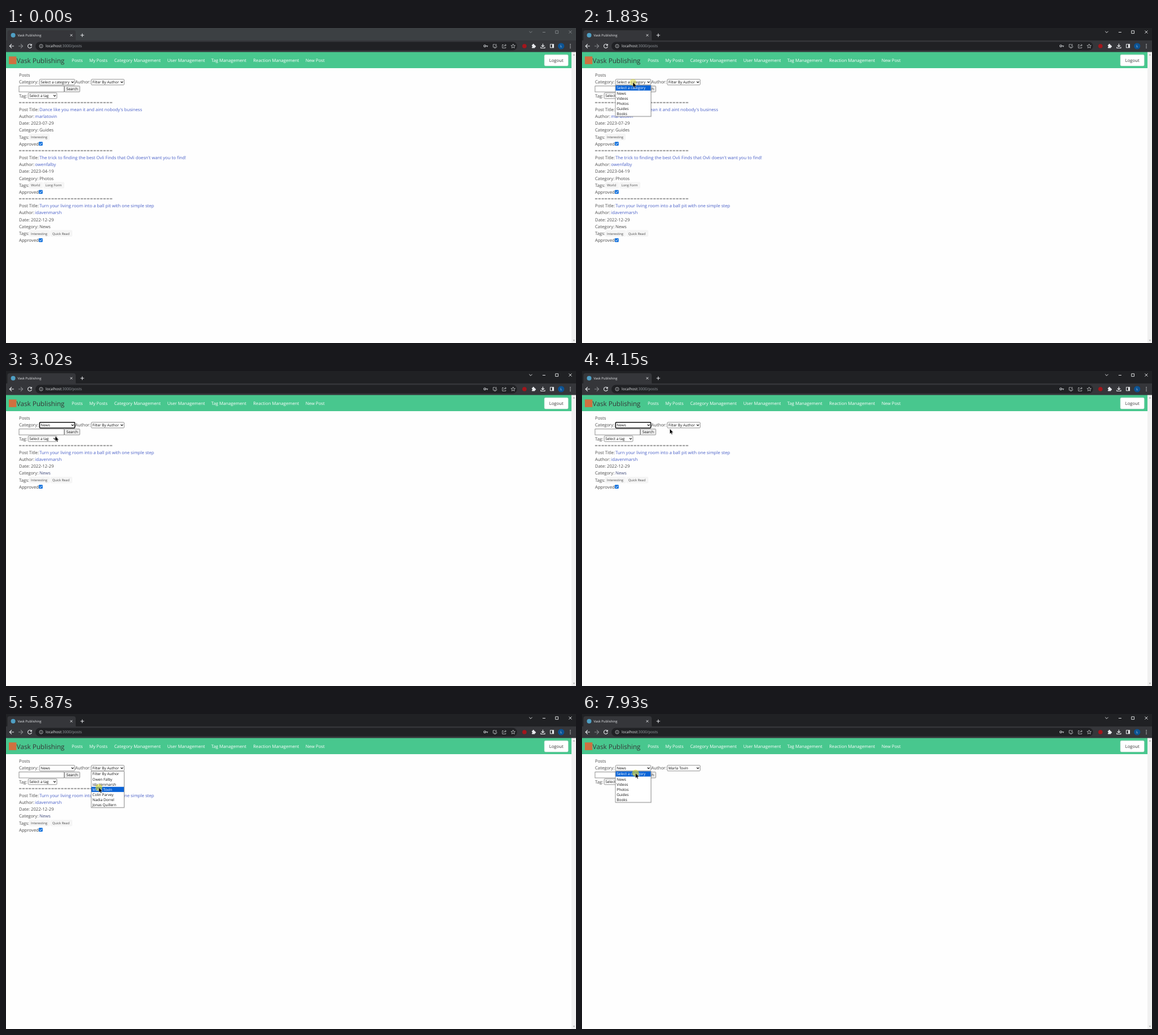
An HTML page that plays this animation: 1006 by 557 pixels, repeating every 7990 ms.

```html
<!DOCTYPE html>
<html lang="en">
<head>
<meta charset="utf-8">
<title>Posts</title>
<style>
  html, body { margin: 0; width: 100%; height: 100%; overflow: hidden; background: #fefefe; }
  svg { display: block; width: 1006px; height: 557px; font-family: "Open Sans", "Noto Sans", sans-serif; }
  text { white-space: pre; text-rendering: geometricPrecision; }
</style>
</head>
<body>
<svg id="stage" viewBox="0 0 1006 557"></svg>
<script>
const LOOP = 7990;
const INK = '#4a4a4a', LINK = '#485fc7', DARK = '#363636', PICK = '#0a63d6';
const BODY = 7.72, FORM = 6.48, TAG = 5.78, ROW = 12.17, OPTION = 9.1;

// Markup helpers; text is placed by the middle of its capitals.
const text = (x, y, s, size = BODY, fill = INK, more = '') =>
  `<text x="${x}" y="${y + size * 0.36}" font-size="${size}" fill="${fill}" ${more}>${s}</text>`;
const rect = (x, y, w, h, fill, more = '') =>
  `<rect x="${x}" y="${y}" width="${w}" height="${h}" fill="${fill}" ${more}/>`;
const line = (d, color, width = 1, more = '') =>
  `<path d="${d}" fill="none" stroke="${color}" stroke-width="${width}" ${more}/>`;
const circle = (x, y, r, fill, more = '') =>
  `<circle cx="${x}" cy="${y}" r="${r}" fill="${fill}" ${more}/>`;
const group = (id, inner, more = '') => `<g id="${id}" ${more}>${inner}</g>`;

function browserChrome() {
  const pale = '#e8eaed', soft = '#c4c7ca';
  const icons = [
    line('M14 32H6.5M10 28.3L6.3 32L10 35.7', pale, 1.1),
    line('M22 32H29.5M26 28.3L29.7 32L26 35.7', '#85888b', 1.1),
    line('M44.6 29.8A3.4 3.4 0 1 0 45.3 32.6M45.2 28.2V30.6H42.8', pale, 1.1),
    circle(62, 32, 3.1, 'none', `stroke="${soft}" stroke-width=".8"`),
    line('M62 31.5V33.8M62 30V30.8', soft, .8),
    circle(845, 31.7, 1.7, 'none', `stroke="${soft}" stroke-width="1.1"`),
    line('M846.8 31.7H850.6M849.4 31.7V33.4', soft, 1.1),
    line('M863 29H859.8V34H866V32M861.5 35.3H864.5M864.8 28V31.2M863.4 30L864.8 31.4L866.2 30', soft, .8),
    line('M878 29.5H876V35.3H882V33.5M878 33Q878.5 30.3 882.5 30.3M880.8 28.4L882.7 30.3L880.8 32.2', soft, .8),
    line('M895 28.4L896.1 30.8L898.7 31L896.7 32.7L897.3 35.3L895 33.9L892.7 35.3L893.3 32.7L891.3 31L893.9 30.8Z', soft, .8),
    circle(915, 32, 3.8, '#a3161c'),
    rect(928, 29.7, 5.6, 5.8, pale, 'rx=".7"'), circle(930.8, 29.4, 1.3, pale), circle(933.9, 32.6, 1.3, pale),
    circle(928.2, 32.7, 1, '#35363a'),
    line('M947.5 27.8V32.8M945 30.8L947.5 33.2L950 30.8M944 33.4V35.5H951V33.4', pale, 1.2),
    rect(960.6, 28.8, 6, 6, 'none', `stroke="${pale}"`), rect(964, 28.8, 2.8, 6, pale),
    circle(979.8, 32, 5.6, '#0b5394'), text(979.8, 32, 'L', 5.8, '#dce9f5', 'text-anchor="middle"'),
    ...[29, 32, 35].map(y => circle(996, y, .8, pale)),
  ].join('');
  return rect(0, 0, 1006, 23, '#3c4043', 'id="strip"')
    + rect(0, 22, 1006, 21, '#35363a')
    + '<path d="M0 23Q2.5 23 2.5 20V8Q2.5 4 6.5 4H119Q123 4 123 8V20Q123 23 126 23Z" fill="#35363a"/>'
    + circle(12.6, 12.8, 4, '#4f9fc4')
    + text(20.5, 12.8, 'Vask Publishing', 5.8, pale)
    + line('M113.4 10.9L117.2 14.7M117.2 10.9L113.4 14.7', pale, .9)
    + line('M131.5 12.8H137.7M134.6 9.7V15.9', pale, 1)
    + group('controls', line('M923.4 5.8L926 8.4L928.6 5.8M947 7.5H952M969.8 4.8H974.6V9.6H969.8ZM993.4 4.6L998.4 9.6M998.4 4.6L993.4 9.6', 'currentColor', .9))
    + rect(52, 24.4, 850, 15.2, '#202124', 'rx="7.6"')
    + text(70, 32, `localhost<tspan fill="#9aa0a6">:3000/posts</tspan>`, 6.65, pale)
    + icons;
}

function navbar() {
  const items = [[116, 'Posts'], [147, 'My Posts'], [191, 'Category Management'], [284.7, 'User Management'],
    [362.3, 'Tag Management'], [436.3, 'Reaction Management'], [528.8, 'New Post']];
  return rect(0, 42.5, 998, 28.5, '#48c78e')
    + rect(5, 50.3, 13.4, 13.6, '#cf7040')
    + text(18.7, 57.8, 'Vask Publishing', 11.7, DARK, 'font-weight="500"')
    + items.map(([x, s]) => text(x, 57.3, s, BODY, '#fff')).join('')
    + rect(950.2, 47.2, 42, 19.8, '#fff', 'rx="2" stroke="#dbdbdb" stroke-width=".5"')
    + text(958.7, 57.2, 'Logout', BODY, DARK)
    + rect(998, 42.5, 8, 514.5, '#f1f1f1')
    + '<path d="M1000.6 48.4L1002.4 46L1004.2 48.4ZM1000.6 551.4L1002.4 553.8L1004.2 551.4Z" fill="#a3a3a3"/>';
}

function select(id, x, y, w, label) {
  const right = x + w;
  return rect(x, y, w, 10, '#fff', `id="${id}Box" rx="1.2" stroke="#767676" stroke-width=".8"`)
    + text(x + 2, y + 5.2, label, FORM, '#111', `id="${id}Label"`)
    + line(`M${right - 6} ${y + 3.9}L${right - 4} ${y + 6}L${right - 2} ${y + 3.9}`, '#111', 1.1);
}

function filters() {
  return text(23, 83.6, 'Posts') + text(23, 95.7, 'Category:') + text(122.3, 95.7, 'Author:') + text(23, 119.9, 'Tag:')
    + select('category', 59.3, 90.7, 62.2, 'Select a category')
    + select('author', 150.5, 90.7, 58, 'Filter By Author')
    + rect(23, 102.6, 79.6, 10.4, '#fff', 'stroke="#767676" stroke-width=".8"')
    + rect(103.2, 102.6, 27, 10.4, '#efefef', 'rx="1" stroke="#767676" stroke-width=".8"')
    + text(106.6, 107.9, 'Search', FORM, '#111')
    + select('tag', 39.2, 114.8, 50.6, 'Select a tag');
}

const posts = [
  { title: "Dance like you mean it and aint nobody's business", author: 'marlatovin', date: '2023-07-29', category: 'Guides',
    tags: [['Interesting', 44, 77]] },
  { title: "The trick to finding the best Ovli Finds that Ovli doesn't want you to find!", author: 'owenfalby', date: '2023-04-19', category: 'Photos',
    tags: [['World', 44, 65], ['Long Form', 69.5, 103]] },
  { title: 'Turn your living room into a ball pit with one simple step', author: 'idavenmarsh', date: '2022-12-29', category: 'News',
    tags: [['Interesting', 44, 77.5], ['Quick Read', 81.8, 117]] },
];

function post(p, slot, categoryInk = INK) {
  const y = n => 131.9 + (slot * 7 + n) * ROW;
  const rule = `<text x="22.2" y="${y(0) + 2.2}" font-size="6.84" fill="${INK}" font-family="DejaVu Sans, sans-serif">${'='.repeat(29)}</text>`;
  const chips = p.tags.map(([s, x, end]) =>
    rect(x - 3.5, y(5) - 5.8, end - x + 3.5, 11.6, '#f5f5f5', 'rx="2"') + text(x, y(5) + .3, s, TAG)).join('');
  const box = y(6) - .2;
  return rule
    + text(23, y(1), 'Post Title:') + text(59, y(1), p.title, BODY, LINK, 'class="title"')
    + text(23, y(2), 'Author:') + text(51.3, y(2), p.author, BODY, LINK)
    + text(23, y(3), 'Date: ' + p.date)
    + text(23, y(4), 'Category:') + text(58.9, y(4), p.category, BODY, categoryInk)
    + text(23, y(5), 'Tags:') + chips
    + text(23, y(6), 'Approved') + rect(57.9, box - 3.4, 6.8, 6.8, '#0f6fdc', 'rx="1"')
    + line(`M59.4 ${box}L60.8 ${box + 1.5}L63.3 ${box - 1.6}`, '#fff', 1);
}

function popup(id, x, w, options) {
  const rows = options.map((s, i) => {
    const y = 101.5 + i * OPTION;
    return group('', rect(x + .4, y, w - .8, OPTION, 'none') + text(x + 2.3, y + 4.6, s, FORM, '#111'), 'class="option"');
  }).join('');
  const h = options.length * OPTION + .4;
  return group(id, rect(x - .5, 102, w + 1.8, h + .6, '#000', 'opacity=".1"')
    + rect(x, 101.1, w, h, '#fff', 'stroke="#777" stroke-width=".7"') + rows);
}

const cursorShapes = {
  arrow: '<path d="M0 0V8.8L2 7L3.3 9.9L4.7 9.3L3.4 6.5H6.1Z" fill="#000" stroke="#fff" stroke-width=".35"/>',
  beam: line('M-1.6 -3.6H1.6M0 -3.6V3.6M-1.6 3.6H1.6', '#222', .9),
  hand: '<path d="M-.8 .2Q0 -.6 .8 .2V3.2L4.3 4Q5 4.3 4.8 5.5L4 9.2H-.3L-2.8 5.8Q-2.6 4.6 -.8 5.8Z" fill="#000" stroke="#fff" stroke-width=".35"/>',
};

const stage = document.getElementById('stage');
stage.innerHTML = rect(0, 0, 1006, 557, '#fefefe') + browserChrome() + navbar() + filters()
  + group('allPosts', posts.map((p, i) => post(p, i)).join(''))
  + group('newsPosts', post(posts[2], 0, '#46507f'))
  + popup('categoryPopup', 59, 62.8, ['Select a category', 'News', 'Videos', 'Photos', 'Guides', 'Books'])
  + popup('authorPopup', 150.3, 58.2, ['Filter By Author', 'Owen Falby', 'Ida Venmarsh', 'Marla Tovin', 'Colin Parvey', 'Nadia Dorrel', 'Jonas Quillern'])
  + circle(0, 0, 6, '#d8d62c', 'id="halo"')
  + group('pointer', Object.entries(cursorShapes).map(([k, s]) => group(k, s)).join(''));

const el = id => document.getElementById(id);
const show = (id, on) => el(id).setAttribute('display', on ? 'inline' : 'none');
const within = (t, a, b) => t >= a && t < b;
const titles = [...document.querySelectorAll('#allPosts .title')];

// Pointer path: time, x, y.
const path = [
  [300, 503, 528], [560, 118, 384], [760, 118, 384], [1090, 92, 145], [1160, 92, 136], [1490, 90, 101],
  [1500, 90, 101], [1600, 90, 96], [2150, 90, 96], [2560, 87, 115.3], [3880, 87, 115.3], [4150, 155, 102.3],
  [4340, 166, 96], [4740, 166, 96], [5010, 165.5, 121], [5270, 165, 139], [5470, 165, 139], [5600, 164, 130],
  [6590, 164, 130], [6660, 164, 126], [7130, 95, 93], [7530, 95, 93], [7790, 94.5, 104.5], [LOOP, 94.5, 104.5],
];
const clicks = [[1580, 1900], [2690, 2940], [4340, 4480], [5870, 6000], [7190, 7390], [7930, LOOP + 90]];

function pointerAt(t) {
  if (t <= path[0][0]) return path[0].slice(1);
  const i = path.findIndex(k => k[0] >= t);
  const [t0, x0, y0] = path[i - 1], [t1, x1, y1] = path[i];
  const u = (t - t0) / (t1 - t0), e = u * u * (3 - 2 * u);
  return [x0 + (x1 - x0) * e, y0 + (y1 - y0) * e];
}

// Row of the post list at a height: 0 is the rule, 1 the title.
const listRow = y => within(y, 126, 381) ? Math.floor((y - 125.9) / ROW) : -1;

function pointerShape(t, x, y, popupOpen) {
  if (popupOpen) return 'arrow';
  if (x < 103 && within(y, 102, 113)) return 'beam';
  const row = t < 1560 ? listRow(y) : -1;
  return row < 0 ? 'arrow' : ['beam', 'hand'][row % 7] || 'arrow';
}

function focusRing(id, on) {
  const box = el(id + 'Box');
  box.setAttribute('stroke', on ? '#101010' : '#767676');
  box.setAttribute('stroke-width', on ? 1.6 : .8);
}

function highlight(id, picked) {
  document.querySelectorAll(`#${id} .option`).forEach((row, i) => {
    row.children[0].setAttribute('fill', i === picked ? PICK : 'none');
    row.children[1].setAttribute('fill', i === picked ? '#fff' : '#111');
  });
}

function render(t) {
  const [x, y] = pointerAt(t);
  const hovered = Math.floor((y - 101.5) / OPTION);
  const categoryOpen = within(t, 1690, 2880) || t >= 7260;
  const authorOpen = within(t, 4410, 5940);

  el('strip').setAttribute('fill', t < 1620 ? '#3c4043' : '#202124');
  el('controls').setAttribute('color', t < 1620 ? '#85898d' : '#f1f3f4');

  el('categoryLabel').textContent = t < 2950 ? 'Select a category' : 'News';
  el('authorLabel').textContent = t < 5940 ? 'Filter By Author' : 'Marla Tovin';
  focusRing('category', within(t, 2950, 4400));
  focusRing('author', within(t, 5940, 7200));

  show('allPosts', t < 2980);
  show('newsPosts', within(t, 2980, 6000));
  const row = within(t, 760, 1560) ? listRow(pointerAt(t - 70)[1]) : -1;
  titles.forEach((title, i) => title.setAttribute('fill', row === i * 7 + 1 ? DARK : LINK));

  show('categoryPopup', categoryOpen);
  show('authorPopup', authorOpen);
  highlight('categoryPopup', hovered >= 0 ? hovered : t < 2950 ? 0 : 1);
  highlight('authorPopup', Math.max(0, hovered));

  const click = clicks.find(([a, b]) => within(t, a, b));
  show('halo', click);
  if (click) {
    el('halo').setAttribute('cx', x);
    el('halo').setAttribute('cy', y);
    el('halo').setAttribute('opacity', .62 * Math.min(1, (click[1] - t) / 90));
  }

  show('pointer', t >= 300);
  el('pointer').setAttribute('transform', `translate(${x} ${y})`);
  const shape = pointerShape(t, x, y, categoryOpen || authorOpen);
  Object.keys(cursorShapes).forEach(k => show(k, k === shape));
}

const start = performance.now();
function tick() {
  render((performance.now() - start) % LOOP);
  requestAnimationFrame(tick);
}
tick();
</script>
</body>
</html>
```
